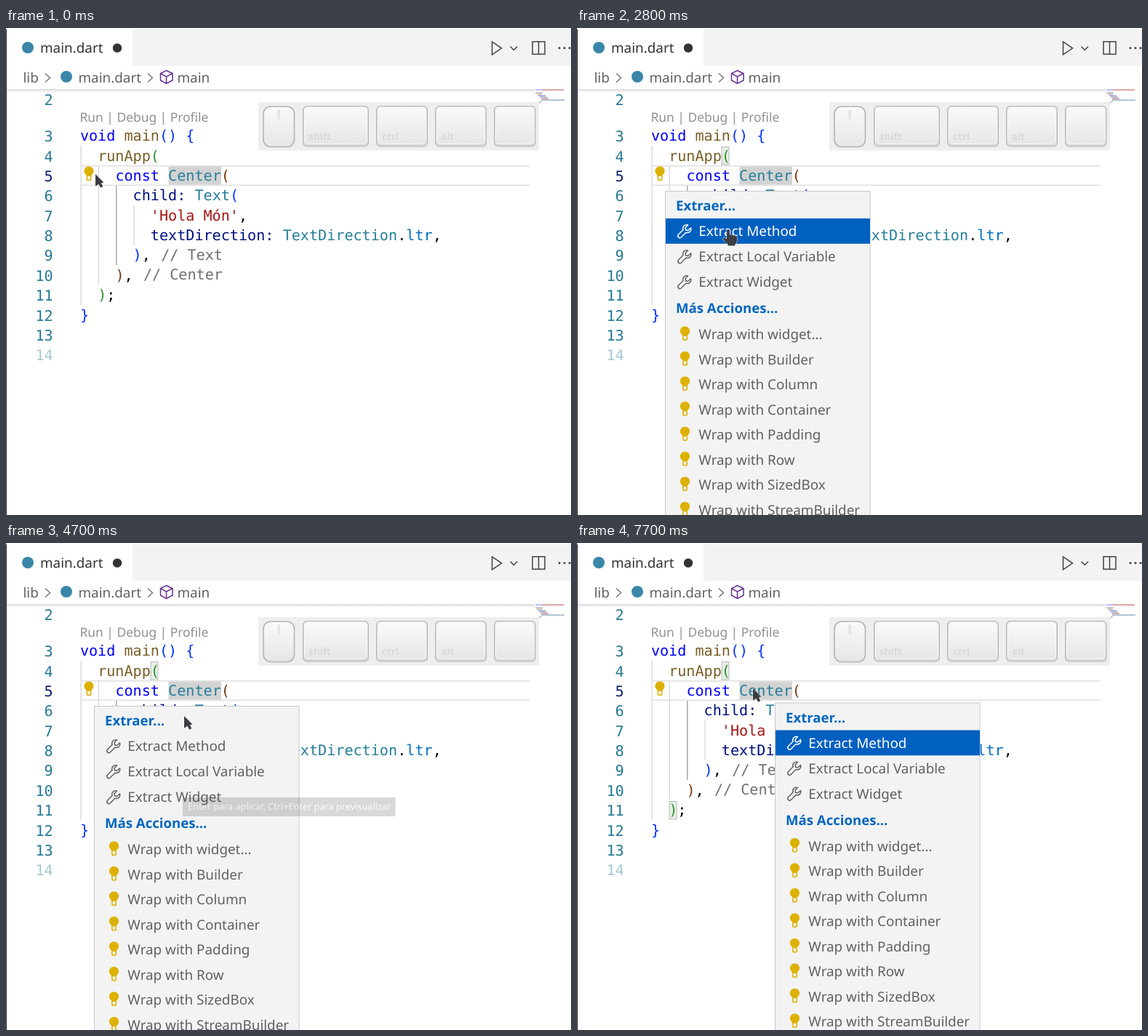
These frames come from a looping animation (777 by 670 pixels, 8 s). An HTML page:

```html
<!DOCTYPE html>
<html lang="es">
<head>
<meta charset="utf-8">
<title>Editor</title>
<style>
html, body { margin: 0; width: 100%; height: 100%; overflow: hidden; background: #fff; }
svg { display: block; width: 777px; height: 670px; text-rendering: geometricPrecision; }
text { white-space: pre; }
.ui { font: 18.85px "Noto Sans", sans-serif; fill: #616161; }
.head { font-weight: 600; font-size: 18.6px; fill: #0066bf; }
.mono { font: 20.13px "DejaVu Sans Mono", monospace; }
.lens { font-size: 17.4px; fill: #919191; }
.tip text { font: 12.7px "Noto Sans", sans-serif; fill: #f4f4f4; }
.tip rect { fill: #2e2e33; }
.key { font: 600 13.5px "Noto Sans", sans-serif; fill: #d9d9d9; }
.key.on { fill: #333; }
.row .bar { fill: none; }
.row.on .bar { fill: #0060c0; }
.row.on text { fill: #fff; }
.row .wrench { fill: none; stroke: #616161; stroke-width: 1.5; stroke-linejoin: round; }
.row.on .wrench { stroke: #fff; }
.match { fill: #e5efe5; stroke: #b9b9b9; }
.cur { fill: #3a3d42; stroke: #fff; stroke-width: 1; paint-order: stroke; stroke-linejoin: round; }
.line { fill: none; stroke: #424242; stroke-width: 1.5; }
</style>
</head>
<body>
<svg id="stage" viewBox="0 0 777 670">
  <defs>
    <linearGradient id="shade" x2="0" y2="1"><stop stop-color="#dadada"/><stop offset="1" stop-color="#fff"/></linearGradient>
    <linearGradient id="cap" x2="0" y2="1"><stop stop-color="#fafafa"/><stop offset="1" stop-color="#e6e6e6"/></linearGradient>
    <g id="bulb">
      <path d="M3.5 13.4V12C-2 8 .2 0 7 0S16 8 10.500 12V13.400Z" fill="#ddb100"/>
      <path d="M4.300 13.500V17Q4.300 18.800 6 18.800H8Q9.700 18.800 9.700 17V13.500" fill="none" stroke="#ddb100" stroke-width="1.600"/>
    </g>
    <path id="wrench" d="M18.500 5.500L14.500 9L11.500 8.300L11 5.300L14.500 1.500C10.500 .2 6.800 3.500 8 8L1.400 14.800C-.6 17.200 2.800 20.700 5.200 18.500L11.900 11.800C16.200 13 19.700 9.500 18.500 5.500Z"/>
  </defs>
  <g id="frame"></g>
  <g id="code"></g>
  <g id="menu"></g>
  <g id="keys"></g>
  <g id="tips"></g>
  <g id="cursors">
    <path id="arrow" class="cur" d="M0 0L11.500 11.500L8 12.300L10.300 17.300L7 18.800L4.500 13.700L0 16.800Z"/>
    <path id="hand" class="cur" d="M-2 2Q-2 0 0 0T2 2V7L9 8.500Q12 9.200 12 12V16Q11.500 19 9.500 20.500V22.500H-.5V20.500Q-4 18 -7 13.500Q-7.500 11 -5 11.500L-2 13.500Z"/>
    <g id="beam" fill="none">
      <path d="M-3-7H-1.500L0-6L1.500-7H3M0-6V6M-3 7H-1.500L0 6L1.500 7H3" stroke="#fff" stroke-width="3"/>
      <path d="M-3-7H-1.500L0-6L1.500-7H3M0-6V6M-3 7H-1.500L0 6L1.500 7H3" stroke="#333" stroke-width="1.300"/>
    </g>
  </g>
</svg>
<script>
const $ = id => document.getElementById(id);
const rect = (x, y, w, h, fill, more = '') =>
  `<rect x="${x}" y="${y}" width="${w}" height="${h}" fill="${fill}" ${more}/>`;
const text = (x, y, s, cls, more = '') => `<text x="${x}" y="${y}" class="${cls}" ${more}>${s}</text>`;
const path = (d, more = '') => `<path class="line" d="${d}" ${more}/>`;
const dot = (x, y, r, fill) => `<circle cx="${x}" cy="${y}" r="${r}" fill="${fill}"/>`;

// Title bar, breadcrumbs and minimap
$('frame').innerHTML =
  rect(174, 2, 603, 50, '#f3f3f3') +
  rect(1, 84, 726, 5, 'url(#shade)') +
  rect(0, 2, 1, 668, '#333') +
  dot(30, 27, 8, '#3a86a8') + dot(83, 67, 8, '#3a86a8') +
  text(47, 34, 'main.dart', 'ui', 'style="fill:#333"') + dot(153, 27.5, 6.2, '#333') +
  text(23.5, 75, 'lib', 'ui') + text(99.5, 75, 'main.dart', 'ui') + text(235.5, 75, 'main', 'ui') +
  path('M54 62.500L60.500 68.500L54 74.500M195 62.500L201.500 68.500L195 74.500', 'style="stroke:#777"') +
  path('M220.500 58.500L229 62.500V72L220.500 76.500L212.500 72V62.500ZM212.500 62.500L220.500 67L229 62.500M220.500 67V76.500', 'style="stroke:#652d90"') +
  path('M668.500 19V36.500L681.500 27.800Z') + path('M693.500 25.500L698.300 30.200L703 25.500') +
  path('M724 18.700H741V36H724ZM732.500 18.700V36') +
  [761, 768, 775].map(x => dot(x, 27.500, 1.500, '#424242')).join('') +
  [[728, 9, '#77f', 84.5], [737, 30, '#b44', 84.5], [728, 10, '#88a', 88.5], [730, 7, '#a96', 90.500],
   [732, 10, '#66c', 92.500], [734, 10, '#68a', 94.500], [736, 10, '#b55', 96.500], [736, 32, '#68a', 98.500],
   [734, 3, '#99c', 100.500], [732, 3, '#a98', 102]]
    .map(([x, w, c, y]) => rect(x, y, w, 1.3, c, 'opacity=".75"')).join('');

// Code
const CH = 12.12, LEFT = 101.9, PITCH = 27.36;
const base = n => 156.3 + (n - 3) * PITCH;
const K = '#00f', FN = '#795e26', TY = '#267f99', VAR = '#001080', STR = '#a31515', CON = '#0070c1',
      B1 = '#0431fa', B2 = '#319331', B3 = '#7b3814', INK = '#000', NOTE = '#707070';
const lines = {
  3: [0, K, 'void ', FN, 'main', B1, '() {'],
  4: [2, FN, 'runApp', B2, '('],
  5: [4, K, 'const ', TY, 'Center', B3, '('],
  6: [6, VAR, 'child', VAR, ': ', TY, 'Text', B1, '('],
  7: [8, STR, "'Hola Món'", INK, ','],
  8: [8, VAR, 'textDirection: ', TY, 'TextDirection', INK, '.', CON, 'ltr', INK, ','],
  9: [6, B1, ')', INK, ','],
  10: [4, B3, ')', INK, ','],
  11: [2, B2, ')', INK, ';'],
  12: [0, B1, '}']
};
const notes = { 9: '// Text', 10: '// Center' };

function codeLine(n) {
  const [indent, ...parts] = lines[n];
  let col = indent, out = '';
  for (let i = 0; i < parts.length; i += 2) {
    out += text(LEFT + col * CH, base(n) - 1, parts[i + 1], 'mono', `fill="${parts[i]}"`);
    col += parts[i + 1].length;
  }
  if (notes[n]) out += text(LEFT + col * CH + 14.3, base(n) - 1.500, notes[n], 'mono', `fill="${NOTE}"`);
  return out;
}

const guide = (x, y1, y2, c) => rect(x, y1, 1.2, y2 - y1, c);
let code = rect(104, 189, 616, 1.5, '#e0e0e0') + rect(104, 215.5, 616, 1.5, '#e0e0e0') +
  rect(223.5, 190.5, 72.5, 25, '#d3d3d3') +
  guide(102.5, 162, 381, '#d3d3d3') + guide(126.700, 190, 353, '#d3d3d3') +
  guide(151.2, 217, 326, '#939393') + guide(175.500, 244, 299, '#d3d3d3') +
  `<g id="match"><rect class="match" x="199" y="163.500" width="10" height="24.500"/>
   <rect class="match" x="127" y="355.500" width="10" height="24.500"/></g>` +
  text(101.5, 129, 'Run | Debug | Profile', 'ui lens') +
  '<use href="#bulb" x="107" y="190.500"/>' + rect(272, 190, 2.2, 26, '#000', 'id="caret"');
for (let n = 2; n <= 14; n++) {
  const y = n === 2 ? 106.3 : base(n);
  const look = n === 5 ? 'fill="#0b216f"' : `fill="#237893" opacity="${n === 14 ? .4 : 1}"`;
  code += text(64.7, y, n, 'mono', `text-anchor="end" ${look}`);
  if (lines[n]) code += codeLine(n);
}
$('code').innerHTML = code;

// Menu, drawn relative to its top left corner
const extract = ['Method', 'Local Variable', 'Widget'];
const wrap = ['widget...', 'Builder', 'Column', 'Container', 'Padding', 'Row', 'SizedBox', 'StreamBuilder'];
$('menu').innerHTML = rect(.5, .5, 281.5, 470, '#f3f3f3', 'stroke="#c8c8c8"') +
  text(15, 27, 'Extraer...', 'ui head') + text(15, 168, 'Más Acciones...', 'ui head') +
  extract.map((s, i) => `<g class="row" transform="translate(0 ${38 + i * 35})">
    <rect class="bar" x="1" width="281" height="34.800"/>
    <use href="#wrench" class="wrench" x="17" y="7.500"/>${text(46.300, 24.300, 'Extract ' + s, 'ui')}</g>`).join('') +
  wrap.map((s, i) => `<use href="#bulb" x="20.500" y="${186.5 + i * 34.5}"/>` +
    text(46.300, 204 + i * 34.500, 'Wrap with ' + s, 'ui')).join('');
const rows = [...document.querySelectorAll('.row')];

// Pressed-key display
const cap = (x, w) => rect(x, 107.5, w, 55.5, '#d4d4d4', 'rx="5" stroke="#b8b8b8"') +
  rect(x + 2, 109, w - 4, 50.5, 'url(#cap)', 'rx="4" stroke="#f8f8f8"');
$('keys').innerHTML = rect(347, 102, 386, 66.5, '#eee') +
  rect(354, 108, 42.5, 55.5, 'url(#cap)', 'rx="10" stroke="#b4b4b4" stroke-width="1.600"') +
  rect(373.5, 112, 3.5, 14, '#e4e4e4', 'rx="1.700" id="wheel"') +
  '<circle id="click" cx="365.700" cy="120" r="7.300" fill="#fff" stroke="#1ca8e8" stroke-width="2.800"/>' +
  cap(408.5, 90) + cap(509.5, 70) + cap(590.5, 70) + cap(671.5, 56.5) +
  text(416, 154, 'shift', 'key') + text(517, 154, 'ctrl', 'key', 'id="ctrl"') + text(598, 154, 'alt', 'key') +
  text(680, 140, '.', 'key on', 'id="period" style="font-size:24px"');

const tip = (id, x, y, w, s) =>
  `<g id="${id}" class="tip"><rect x="${x}" y="${y}" width="${w}" height="26" rx="1"/>${text(x + 7, y + 17.2, s, '')}</g>`;
$('tips').innerHTML = tip('tipA', 132.5, 215.5, 221, 'Mostrar acciones de código (Ctrl+.)') +
  tip('tipB', 243, 350, 292.5, 'Enter para aplicar, Ctrl+Enter para previsualizar');

// Stepped tracks: [time, value...]
const LOOP = 8000;
const tracks = {
  cursor: [[0, 'arrow', 123, 201], [100, 'arrow', 121.5, 201], [2200, 'arrow', 133, 212], [2300, 'arrow', 152, 227],
    [2400, 'arrow', 172, 231], [2800, 'hand', 208, 277], [2900, 'hand', 212, 286], [3000, 'hand', 217, 300],
    [3100, 'hand', 221, 308], [3400, 'hand', 235, 332], [3700, 'hand', 231, 333], [4500, 'hand', 234, 332],
    [4600, 'hand', 243, 297], [4700, 'arrow', 245, 238], [4800, 'arrow', 246, 222], [4900, 'arrow', 245, 211],
    [5000, 'arrow', 243, 204], [5100, 'arrow', 242, 200], [5300, 'beam', 242, 200], [6700, 'arrow', 242, 200]],
  menu: [[0], [1800, 121, 224], [5300], [6700, 272, 219.5]],
  row: [[0, 0], [2300, -1], [2800, 0], [3000, 1], [3400, 2], [4600, 1], [4700, -1], [6700, 0]],
  tipA: [[0, 0], [900, 1], [1700, .72], [1800, .3], [1900, 0]],
  tipB: [[0, 0], [4400, 1], [4600, .65], [4700, .18], [4800, 0]],
  click: [[0, 0], [1700, 1], [2000, 0], [5200, 1], [5500, 0]],
  match: [[0, 0], [1800, 1]],
  caret: [[0, 0], [5300, 1], [5700, 0], [6200, 1], [6700, 0]],
  ctrl: [[0, 0], [6400, 1], [7700, 0]],
  period: [[0, 0], [6700, 1], [7300, 0]]
};
const at = (name, t) => tracks[name].filter(k => k[0] <= t).pop().slice(1);
const show = (id, on) => { $(id).style.display = on ? '' : 'none'; };

function render(t) {
  const [shape, x, y] = at('cursor', t);
  for (const id of ['arrow', 'hand', 'beam']) show(id, id === shape);
  $('cursors').setAttribute('transform', `translate(${x} ${y})`);

  const pos = at('menu', t);
  show('menu', pos.length);
  if (pos.length) $('menu').setAttribute('transform', `translate(${pos})`);
  const [active] = at('row', t);
  rows.forEach((r, i) => r.classList.toggle('on', i === active));

  for (const id of ['tipA', 'tipB']) $(id).style.opacity = at(id, t)[0];
  for (const id of ['click', 'match', 'caret', 'period']) show(id, at(id, t)[0]);
  show('wheel', !at('click', t)[0]);
  $('ctrl').classList.toggle('on', !!at('ctrl', t)[0]);
}

const start = performance.now();
function tick() {
  render((performance.now() - start) % LOOP);
  requestAnimationFrame(tick);
}
tick();
</script>
</body>
</html>
```
